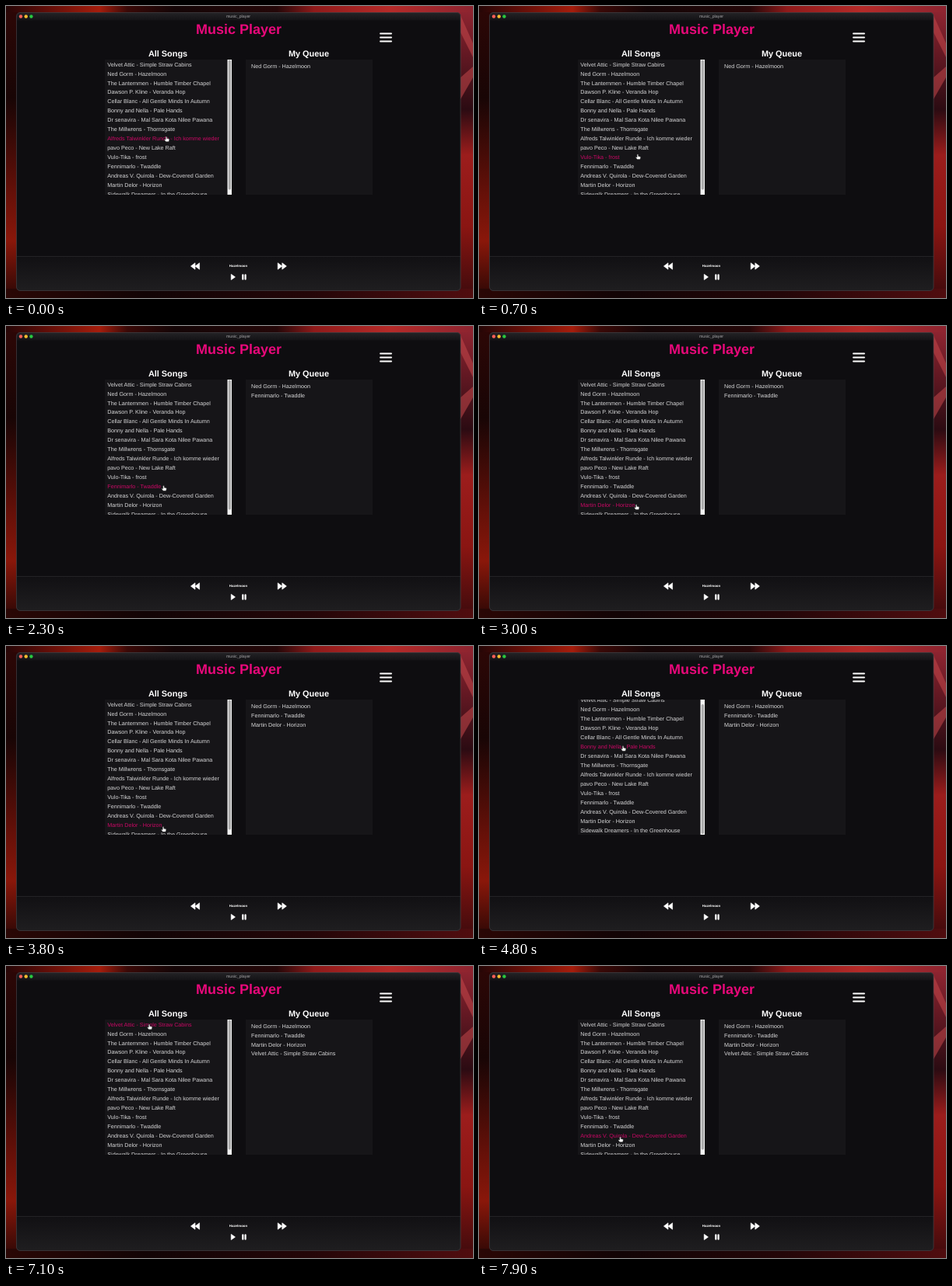
An HTML page for the animation above (8 s loop, 600 px wide and 376 px high).

```html
<!DOCTYPE html>
<html lang="en">
<head>
<meta charset="utf-8">
<title>Music Player</title>
<style>
  html, body { margin: 0; width: 100%; height: 100%; overflow: hidden; background: #100506; }
  svg { display: block; }
  #stage { width: 100vw; height: 100vh; }
  text { font-family: "Liberation Sans", Arial, sans-serif; text-rendering: geometricPrecision; fill: #fff; }
  .bold { font-weight: 700; text-anchor: middle; }
  .song { font-size: 7.2px; fill: #d9d9da; }
  .song.hover { fill: #cb0865; }
</style>
</head>
<body>
<svg id="stage" viewBox="0 0 600 376">
  <defs>
    <linearGradient id="topGlow">
      <stop offset="0" stop-color="#250606"/>
      <stop offset=".08" stop-color="#5c0d08"/>
      <stop offset=".2" stop-color="#a51d0c"/>
      <stop offset=".26" stop-color="#3a0907"/>
      <stop offset=".36" stop-color="#140506"/>
      <stop offset=".58" stop-color="#240708"/>
      <stop offset=".66" stop-color="#8f1a1a"/>
      <stop offset=".82" stop-color="#b52a28"/>
      <stop offset="1" stop-color="#8d2430"/>
    </linearGradient>
    <linearGradient id="leftGlow" x2="0" y2="1">
      <stop offset="0" stop-color="#2c0706"/>
      <stop offset=".3" stop-color="#180505"/>
      <stop offset=".6" stop-color="#5e0f08"/>
      <stop offset=".8" stop-color="#8a170a"/>
      <stop offset="1" stop-color="#2a0705"/>
    </linearGradient>
    <linearGradient id="rightGlow" x2="0" y2="1">
      <stop offset="0" stop-color="#8d2430"/>
      <stop offset=".18" stop-color="#5a1620"/>
      <stop offset=".34" stop-color="#2b0b12"/>
      <stop offset=".5" stop-color="#9c1d1c"/>
      <stop offset=".75" stop-color="#8a1512"/>
      <stop offset="1" stop-color="#3c0a0c"/>
    </linearGradient>
    <linearGradient id="bottomGlow">
      <stop offset="0" stop-color="#2a0705"/>
      <stop offset=".3" stop-color="#120405"/>
      <stop offset=".65" stop-color="#240608"/>
      <stop offset="1" stop-color="#500d0f"/>
    </linearGradient>
    <linearGradient id="bar" x2="0" y2="1">
      <stop offset="0" stop-color="#242326"/>
      <stop offset="1" stop-color="#141316"/>
    </linearGradient>
    <linearGradient id="footer" x2="0" y2="1">
      <stop offset="0" stop-color="#111013"/>
      <stop offset="1" stop-color="#1f1e20"/>
    </linearGradient>
    <clipPath id="frame"><rect x="13.5" y="8.5" width="570.5" height="358" rx="4.5"/></clipPath>
    <path id="skip" d="M0-4.2 5.6 0 0 4.2ZM5.6-4.2 11.2 0 5.6 4.2Z" stroke-linejoin="round" stroke-width=".6" fill="#fff" stroke="#fff"/>
  </defs>

  <rect width="600" height="376" fill="url(#topGlow)"/>
  <rect y="8" width="16" height="368" fill="url(#leftGlow)"/>
  <rect x="580" y="8" width="20" height="368" fill="url(#rightGlow)"/>
  <rect y="364" width="600" height="12" fill="url(#bottomGlow)"/>
  <path d="M584 12 600 48V66L584 34ZM584 92 600 78V92L584 120Z" fill="#c5474c" opacity=".55"/>

  <g clip-path="url(#frame)">
    <rect x="13" y="8" width="572" height="359" fill="#0e0d10"/>
    <rect x="13" y="8" width="572" height="10.5" fill="url(#bar)"/>
    <rect x="13" y="322.5" width="572" height="44.5" fill="url(#footer)"/>
    <path d="M13 322.5H585" stroke="#29282b" stroke-width=".8"/>
  </g>
  <rect x="13.5" y="8.5" width="570.5" height="358" rx="4.5" fill="none" stroke="#454247" stroke-width=".7"/>
  <circle cx="19" cy="13.5" r="2.2" fill="#fe5f57"/>
  <circle cx="25.7" cy="13.5" r="2.2" fill="#febc2e"/>
  <circle cx="32.4" cy="13.5" r="2.2" fill="#28c840"/>
  <text x="298.5" y="15.2" font-size="5.3" text-anchor="middle" style="fill:#aaa9ab">music_player</text>

  <text class="bold" x="299" y="36" font-size="18" style="fill:#e8087a">Music Player</text>
  <path d="M481 35.5H495M481 40.5H495M481 45.5H495" stroke="#fff" stroke-width="2" stroke-linecap="round"/>
  <text class="bold" x="208" y="65.2" font-size="10.9">All Songs</text>
  <text class="bold" x="389" y="65.2" font-size="10.9">My Queue</text>

  <rect x="127" y="69" width="163" height="174" fill="#161518"/>
  <rect x="308" y="69" width="163" height="174" fill="#161518"/>
  <svg x="127" y="69" width="163" height="174" overflow="hidden">
    <g id="songs"></g>
    <rect x="157.5" width="5.5" height="174" fill="#f3f3f3"/>
    <rect id="thumb" x="158.8" y=".5" width="3.2" height="167" rx="1.6" fill="#aaa"/>
  </svg>
  <g id="queue"></g>

  <use href="#skip" transform="translate(248.6 335) scale(-1 1)"/>
  <use href="#skip" x="349.2" y="335"/>
  <text class="bold" x="298.5" y="335.8" font-size="4.4">Hazelmoon</text>
  <path d="M289.3 345.4 294.4 349 289.3 352.6Z" fill="#fff" stroke="#fff" stroke-width=".8" stroke-linejoin="round"/>
  <path d="M304.3 346.3V351.7M307.6 346.3V351.7" stroke="#fff" stroke-width="2.2" stroke-linecap="round"/>

  <g id="cursor">
    <path d="M-.8 .6Q0-.5.8.6V2.6L3.2 3.1Q4 3.4 3.8 4.4L3.1 6.8H-.6L-2.6 4.2Q-2.4 3.2-.8 4.1Z" fill="#fff" stroke="#222" stroke-width=".5" stroke-linejoin="round"/>
  </g>
</svg>

<script>
const LOOP = 8000, PITCH = 11.96, LIST_TOP = 69;
const titles = [
  "Velvet Attic - Simple Straw Cabins",
  "Ned Gorm - Hazelmoon",
  "The Lanternmen - Humble Timber Chapel",
  "Dawson P. Kline - Veranda Hop",
  "Cellar Blanc - All Gentle Minds In Autumn",
  "Bonny and Nella - Pale Hands",
  "Dr senavira - Mal Sara Kota Nilee Pawana",
  "The Millwrens - Thornsgate",
  "Alfreds Talwinkler Runde - Ich komme wieder",
  "pavo Peco - New Lake Raft",
  "Vulo-Tika - frost",
  "Fennimarlo - Twaddle",
  "Andreas V. Quirola - Dew-Covered Garden",
  "Martin Delor - Horizon",
  "Sidewalk Dreamers - In the Greenhouse"
];
// [time, song index]
const picks = [[0, 1], [1900, 11], [3400, 13], [7000, 0]];
// [time, x, y] of the fingertip
const path = [
  [0, 206, 168], [300, 206, 168], [1000, 202.5, 205.5], [2600, 202.5, 205.5],
  [3100, 202, 232.5], [4000, 202, 232.5], [4700, 185, 128.5], [5300, 185, 128.5],
  [5800, 184, 110], [6300, 184, 110], [6700, 184, 75], [7200, 184, 75], [7850, 181.5, 220]
];
// [time, scroll offset]
const scrolling = [[0, 0], [3900, 0], [4300, 5.5], [5300, 5.5], [5600, 0]];

const byId = id => document.getElementById(id);
const songs = byId("songs"), queue = byId("queue"), thumb = byId("thumb"), cursor = byId("cursor");

function addSong(parent, title, x, y) {
  const row = document.createElementNS("http://www.w3.org/2000/svg", "text");
  row.setAttribute("class", "song");
  row.setAttribute("x", x);
  row.setAttribute("y", y);
  row.textContent = title;
  return parent.appendChild(row);
}

const rows = titles.map((title, i) => addSong(songs, title, 3.3, 8.6 + i * PITCH));
const queued = picks.map(([, song], i) => addSong(queue, titles[song], 315, 79.6 + i * PITCH));

function sample(keys, t) {
  const next = keys.findIndex(key => key[0] > t);
  if (next < 0) return keys[keys.length - 1].slice(1);
  const a = keys[next - 1], b = keys[next];
  const p = (t - a[0]) / (b[0] - a[0]);
  const eased = p * p * (3 - 2 * p);
  return a.slice(1).map((v, i) => v + (b[i + 1] - v) * eased);
}

function draw(t) {
  const [x, y] = sample(path, t);
  const [scroll] = sample(scrolling, t);
  const hovered = Math.floor((y + scroll - LIST_TOP) / PITCH);
  songs.setAttribute("transform", `translate(0 ${-scroll})`);
  thumb.setAttribute("y", 0.5 + scroll);
  cursor.setAttribute("transform", `translate(${x} ${y})`);
  rows.forEach((row, i) => row.classList.toggle("hover", i === hovered));
  queued.forEach((row, i) => row.style.visibility = t >= picks[i][0] ? "visible" : "hidden");
}

const start = performance.now();
function tick() {
  draw((performance.now() - start) % LOOP);
  requestAnimationFrame(tick);
}
tick();
</script>
</body>
</html>
```
